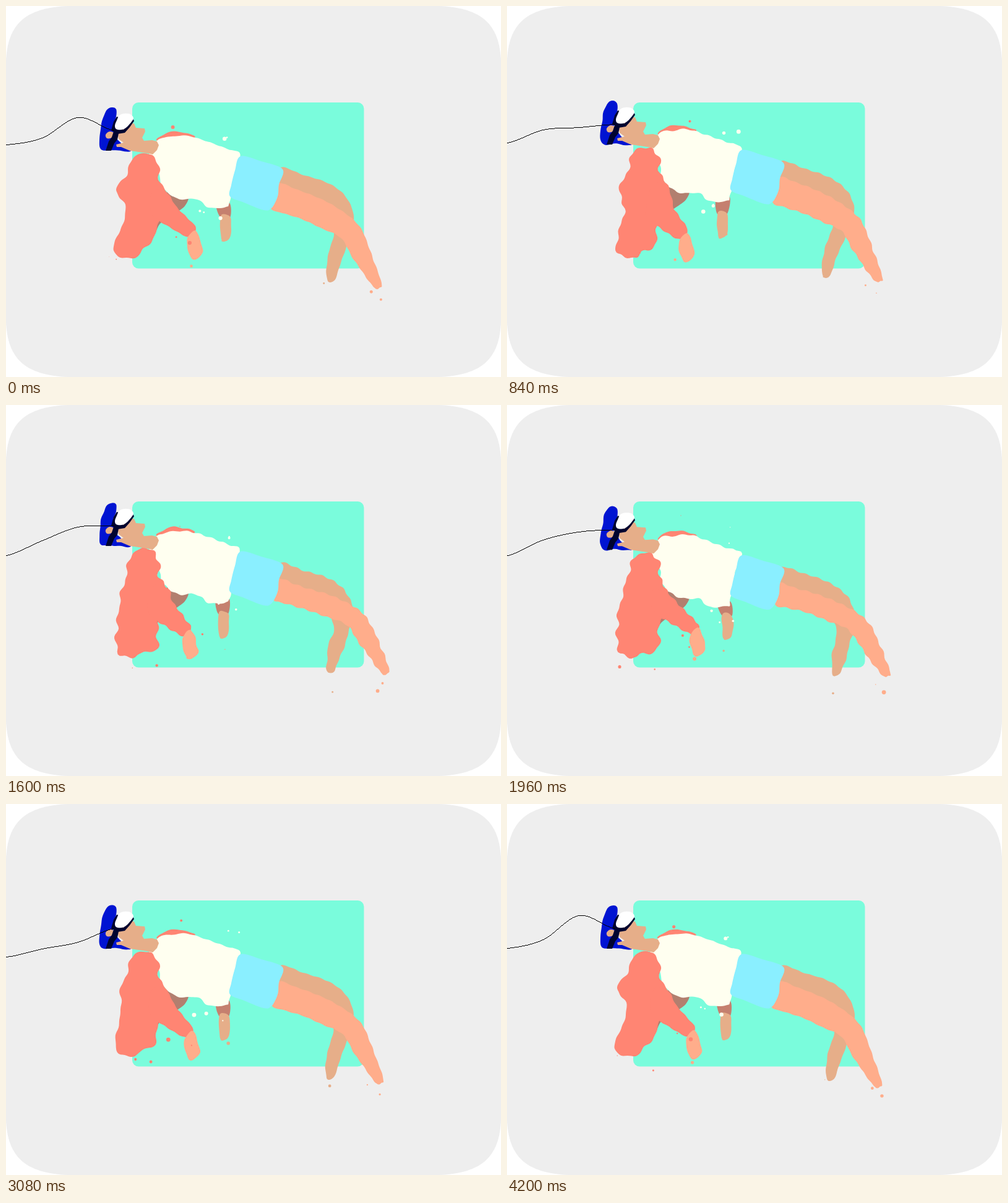
These frames come from a looping animation (800 px wide and 600 px high, 4240 ms). An HTML page with a canvas:

```html
<!DOCTYPE html>
<html lang="en">
<head>
<meta charset="utf-8">
<title>Floating</title>
<style>
html, body { margin: 0; width: 100%; height: 100%; overflow: hidden; background: #fff; }
canvas { display: block; }
</style>
</head>
<body>
<canvas id="stage" width="800" height="600"></canvas>
<script>
const ctx = document.getElementById('stage').getContext('2d');
const LOOP = 4240, STEP = 40, TURN = 2 * Math.PI;
const CORAL = '#ff8573', PEACH = '#ffad8b', TAN = '#e6ae89', CREAM = '#fffff0';
const BROWN = '#b27f6f', CUFF = '#c5806f', SHORTS = '#8aefff', HAIR = '#0014d2', NAVY = '#000430';

// Key poses; everything else follows from these few curves
const TIMES = [0, 840, 1600, 2400, 3080, 3840, 4200];
const BOB = [0, -10, -6, 7, 0, -2, 0];
const KICK = [0, 0, 1, .85, .25, -.35, -.1];
const REACH = [0, -1, -.5, .9, -.3, -.6, -.2];
const CABLE = [
  [224, 221, 243, 241, 247, 264, 233],
  [213, 200, 219, 216, 234, 241, 219],
  [180, 196, 197, 216, 223, 224, 180]
];

let time, bob, sway, amp;

// Smooth periodic interpolation through the key poses
function at(keys) {
  const n = TIMES.length;
  const when = i => TIMES[(i + n) % n] + LOOP * Math.floor(i / n);
  const val = i => keys[(i + n) % n];
  const slope = i => (val(i + 1) - val(i - 1)) / (when(i + 1) - when(i - 1));
  let i = n - 1;
  while (TIMES[i] > time) i--;
  const gap = when(i + 1) - when(i), u = (time - when(i)) / gap, v = 1 - u;
  return v * v * ((1 + 2 * u) * val(i) + u * gap * slope(i)) +
         u * u * ((1 + 2 * v) * val(i + 1) - v * gap * slope(i + 1));
}

function random(seed) {
  const n = Math.sin(seed * 127.1 + 11.7) * 43758.5453;
  return n - Math.floor(n);
}

function spline(a, b, c, d, u) {
  return b + u / 2 * (c - a + u * (2 * a - 5 * b + 4 * c - d + u * (3 * (b - c) + d - a)));
}

// Moves points with the body, and more with a limb the nearer they are to its tip
function pose(flat, limb) {
  const pts = [];
  for (let i = 0; i < flat.length; i += 2) {
    const x = flat[i], y = flat[i + 1];
    const u = limb ? Math.min(1, Math.max(0, (y - limb.from) / (limb.to - limb.from))) : 0;
    const w = u * (2 - u);
    pts.push(w ? [x + limb.dx * w, y + bob + limb.dy * w] : [x, y + bob]);
  }
  return pts;
}

// Fills a rounded outline whose edge ripples along its normal
function blob(color, pts, ripple = 0) {
  const n = pts.length, line = [], phase = 3 * TURN * time / LOOP;
  pts.forEach((b, i) => {
    const a = pts[(i + n - 1) % n], c = pts[(i + 1) % n], d = pts[(i + 2) % n];
    const steps = Math.ceil(Math.hypot(c[0] - b[0], c[1] - b[1]) / 3) || 1;
    for (let s = 0; s < steps; s++)
      line.push([0, 1].map(k => spline(a[k], b[k], c[k], d[k], s / steps)));
  });
  ctx.beginPath();
  line.forEach(([x, y], i) => {
    const p = line[(i || line.length) - 1], q = line[(i + 1) % line.length];
    const tx = q[0] - p[0], ty = q[1] - p[1], len = Math.hypot(tx, ty) || 1;
    const r = ripple * amp * (Math.sin(.25 * x + .2 * y + phase) + .6 * Math.sin(.15 * x - .25 * y - phase));
    ctx.lineTo(x + ty / len * r, y - tx / len * r);
  });
  ctx.fillStyle = color;
  ctx.fill();
}

function poly(color, flat) {
  ctx.beginPath();
  pose(flat).forEach(p => ctx.lineTo(...p));
  ctx.fillStyle = color;
  ctx.fill();
}

// Drops leave a stretch of edge, drift away and vanish, over and over
function drops(color, left, right, y, dir, count) {
  const lives = 10;
  ctx.fillStyle = color;
  for (let i = 0; i < count; i++) {
    const id = left + y + i * 7.3, clock = time / LOOP * lives + random(id);
    const u = clock % 1, seed = id + Math.floor(clock) % lives * 3.1;
    const x = left + (right - left) * random(seed), r = 1.3 + 2.2 * random(seed + .5);
    ctx.beginPath();
    ctx.arc(x, y + bob + dir * 28 * u, r * Math.sqrt(Math.sin(Math.PI * u)), 0, TURN);
    ctx.fill();
  }
}

function backdrop() {
  ctx.fillStyle = '#fff';
  ctx.fillRect(0, 0, 800, 600);
  ctx.fillStyle = '#eee';
  ctx.fill(new Path2D('M0 88C3 30 30 3 100 0H700C770 3 797 30 800 88V512C797 570 770 597 700 600H100C30 597 3 570 0 512Z'));
  ctx.fillStyle = '#7afcdc';
  ctx.beginPath();
  ctx.roundRect(204, 156, 374.5, 268.5, 10);
  ctx.fill();
}

function body(kick, reach) {
  const farHand = { from: 315, to: 350, dx: 7 * reach, dy: -5 * reach };
  const farFoot = { from: 340, to: 440, dx: 9 * reach + 5 * kick, dy: -2 * reach - 8 * kick };
  const foot = { from: 300, to: 440, dx: 12 * kick, dy: -16 * kick };
  blob(CORAL, pose([244, 218, 258, 206, 273, 203, 288, 205, 306, 211, 290, 222]), .4);
  blob(BROWN, pose([262, 300, 293, 307, 290, 322, 277, 333, 250, 351, 240, 370, 228, 385, 222, 380, 240, 340]));
  blob(CUFF, pose([340, 318, 361, 318, 362, 342, 346, 341], farHand));
  blob(TAN, pose([347, 339, 362, 341, 364, 358, 362, 374, 355, 380, 348, 377], farHand), .3);
  blob(TAN, pose([443, 262, 480, 273, 510, 282, 535, 295, 553, 314, 562, 346, 549, 392, 537, 428, 530, 444,
    520, 446, 518, 430, 520, 405, 529, 362, 500, 325, 441, 300], farFoot), .5);
  blob(PEACH, pose([436, 287, 470, 297, 500, 308, 527, 321, 560, 344, 577, 366, 590, 400, 607, 448, 604, 455,
    594, 454, 562, 410, 541, 375, 510, 360, 478, 345, 445, 334, 428, 326], foot), .5);
  blob(CREAM, pose([231, 239, 246, 216, 270, 211, 295, 210, 322, 218, 357, 231, 368, 234, 379, 240, 370, 270,
    361, 318, 356, 325, 327, 326, 310, 313, 280, 312, 262, 302, 250, 287, 246, 265]), .5);
  blob(SHORTS, pose([379, 243, 412, 251, 447, 264, 441, 289, 439, 308, 429, 327, 416, 330, 385, 318, 362, 308,
    364, 290, 370, 266]));
}

function jacket(reach) {
  const hand = { from: 305, to: 370, dx: 15 * reach, dy: -14 * reach };
  const back = pose([196, 273, 200, 255, 210, 243, 222, 238, 234, 240, 243, 250, 248, 263, 247, 280, 264, 315, 246, 352]);
  const hem = [
    [240 - 5 * sway, 388 - 6 * sway],
    [221, 397 - 5 * sway],
    [206, 408],
    [177 - 3 * sway, 395],
    [187 + 7 * sway, 332],
    [184 - 6 * sway, 297]
  ];
  blob(CORAL, [...back, ...hem], 1);
  blob(CORAL, pose([238, 298, 262, 305, 276, 325, 300, 350, 307, 358, 306, 366, 296, 374, 270, 361, 235, 335], hand), .6);
  blob(PEACH, pose([295, 372, 307, 363, 317, 390, 317, 400, 306, 410, 298, 406, 292, 383], hand), .4);
}

function head() {
  blob(HAIR, pose([152, 229, 151, 213, 156, 184, 162, 169, 170, 164, 178, 167, 178, 180, 173, 196, 177, 212,
    192, 227, 201, 235, 172, 233, 158, 234]), .4);
  poly(TAN, [200, 189, 207, 190, 210, 197, 224, 198, 225, 203, 220, 213, 223, 218, 236, 217, 244, 219, 247, 225,
    244, 233, 237, 240, 228, 238, 200, 234, 186, 228, 179, 228, 178, 224, 190, 221, 182, 215, 180, 205]);
  blob(TAN, pose([161, 208, 167, 203, 174, 205, 171, 213, 163, 214]));
  poly(NAVY, [174, 203, 182, 206, 180, 216, 175, 222, 170, 234, 161, 234, 166, 219, 171, 212]);
  poly(NAVY, [179, 179, 183, 180, 180, 195, 190, 200, 205, 182, 207, 186, 200, 196, 192, 205, 180, 207, 170, 201, 174, 187]);
  blob('#fff', pose([183, 177, 191, 174, 201, 175, 206, 181, 203, 187, 195, 196, 187, 200, 178, 199, 176, 193, 179, 185]));
}

// A crisp hairline, one pixel per column
function cable() {
  const span = 58, heights = [...CABLE.map(at), 201 + bob];
  const get = i => heights[Math.max(0, Math.min(heights.length - 1, i))];
  ctx.fillStyle = '#000';
  for (let x = 0; x < 3 * span; x++) {
    const i = Math.floor(x / span);
    ctx.fillRect(x, Math.round(spline(get(i - 1), get(i), get(i + 1), get(i + 2), x / span % 1)), 1, 1);
  }
}

function draw(now) {
  time = Math.floor(now % LOOP / STEP) * STEP;
  const angle = TURN * time / LOOP, reach = at(REACH);
  bob = at(BOB);
  sway = Math.cos(angle);
  amp = 1.4 + .7 * Math.sin(angle - .8);
  backdrop();
  body(at(KICK), reach);
  jacket(reach);
  head();
  cable();
  drops(CREAM, 295, 375, 325, 1, 3);
  drops(CREAM, 335, 385, 225, -1, 2);
  drops(CORAL, 165, 245, 405, 1, 2);
  drops(CORAL, 255, 320, 365, 1, 2);
  drops(CORAL, 255, 300, 205, -1, 1);
  drops(PEACH, 270, 310, 400, 1, 1);
  drops(PEACH, 575, 610, 450, 1, 2);
  drops(TAN, 345, 370, 375, 1, 1);
  drops(TAN, 510, 540, 445, 1, 1);
  requestAnimationFrame(draw);
}
requestAnimationFrame(draw);
</script>
</body>
</html>
```
